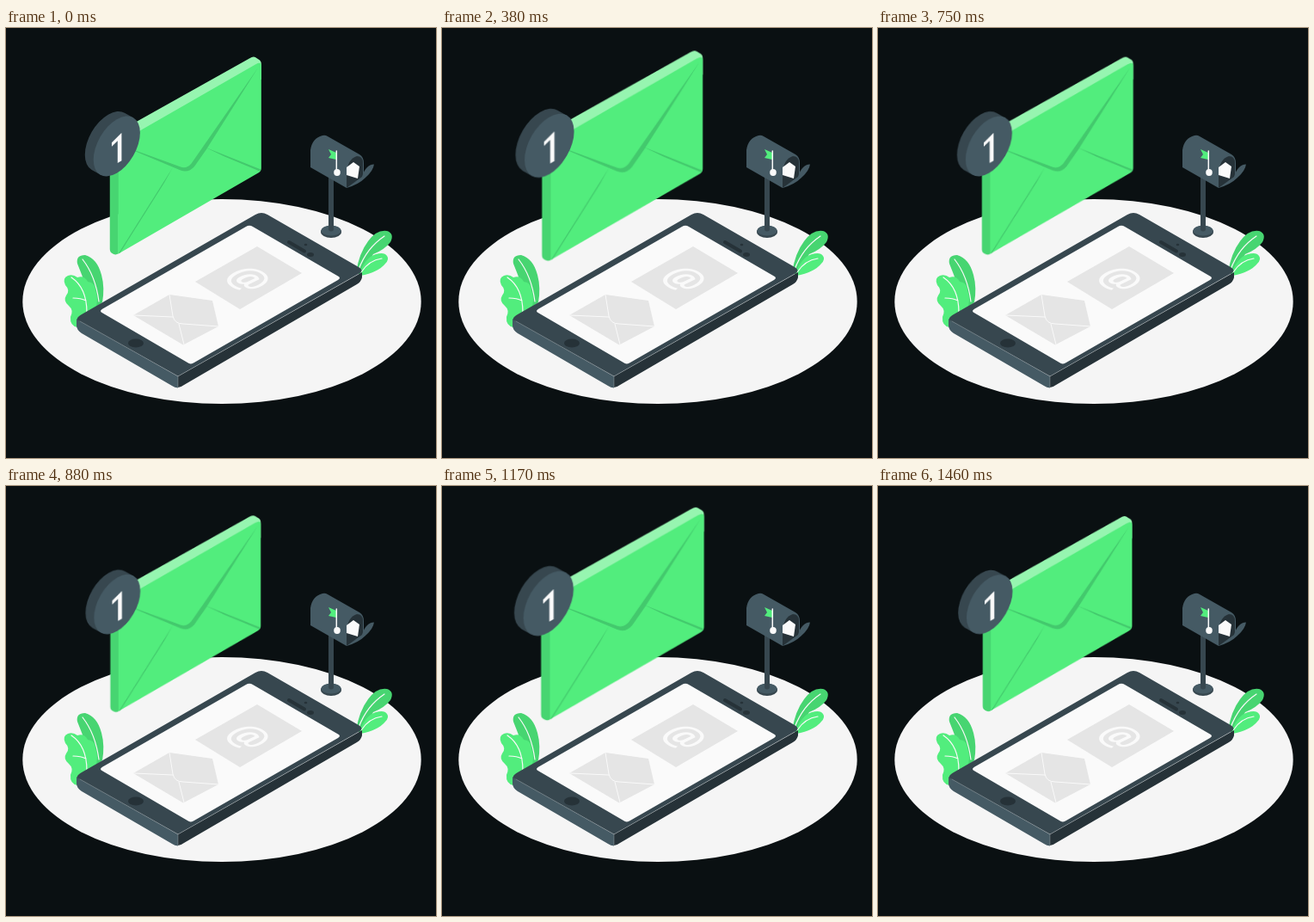
An HTML page without scripts that plays this animation: 500x500 px, repeating every 1.5 s.

```html
<!DOCTYPE html>
<html lang="en">
<head>
<meta charset="utf-8">
<title>New message</title>
<style>
  html, body { margin: 0; width: 100%; height: 100%; overflow: hidden; background: #0a1012; }
  svg { display: block; width: 100vw; height: 100vh; }
  .green { fill: #52ed7d; }
  .shade { fill: #47d571; }
  .steel { fill: #455a64; }
  .slate { fill: #37474f; }
  .night { fill: #263238; }
  .paper { fill: #fafafa; }
  .card { fill: #e5e5e5; }
  .crease { fill: #43c96d; }
  .line { fill: none; stroke: #fafafa; stroke-linecap: round; stroke-linejoin: round; }
  text { font-family: Roboto, sans-serif; fill: #fafafa; }

  .mail {
    transform-origin: 194.3px 148.5px;
    animation: heartbeat 1.5s -.65s linear infinite;
  }
  /* quick beat, quick beat, slow release */
  @keyframes heartbeat {
    0%, 40%, 100% { transform: scale(.986); }
    20%, 60% { transform: scale(1.087); }
  }
</style>
</head>
<body>
<svg viewBox="0 0 500 500">
  <ellipse cx="251" cy="318" rx="231.7" ry="119" fill="#f5f5f5"/>

  <g id="left-plant">
    <path class="shade" d="M83 274Q81 264 92 264Q106 268 111 287Q115 302 112 319L100 328Q94 300 83 274Z"/>
    <path class="green" d="M83 348Q74 346 75 336Q79 328 73 323Q66 317 70 311Q75 305 69 299Q65 291 72 288Q78 286 83 290Q91 287 95 295Q104 296 104 305Q108 316 104 326L100 336Z"/>
    <path class="line" stroke-width="1.2" d="M89 269Q104 288 108 318M76 290Q94 302 94 331M78 314Q87 314 93 317"/>
  </g>

  <g id="right-plant">
    <path class="shade" d="M407 284Q411 261 421 248Q431 234 443 236Q452 239 447 249Q440 258 427 263L412 287Z"/>
    <path class="green" d="M410 288Q417 267 430 263Q440 260 443 265Q446 269 441 274Q433 284 412 288Z"/>
    <path class="line" stroke-width="1.2" d="M410 281Q419 256 440 242M413 284Q422 270 437 268"/>
  </g>

  <g id="mailbox">
    <ellipse class="slate" cx="378" cy="237" rx="12" ry="7"/>
    <ellipse class="steel" cx="378" cy="235.5" rx="11.5" ry="6"/>
    <path class="slate" d="M375 170h6v65q-3 3-6 0z"/>
    <path class="steel" d="M354 162V142Q356 128 368 125Q371 124 374 126L411 147Q416 150 416 157V175L396 186Z"/>
    <path class="night" d="M396 186V167Q398 152 408 149Q415 149 415 157V175Z"/>
    <path class="paper" d="M396 162L404 156L411 161L409 175L396 171Z"/>
    <path class="steel" d="M396 186L414 173Q418 159 428 158.5Q427 166 418 174Q410 182 396 186Z"/>
    <path class="green" d="M375 141L384 145V153L375 151L378 147Z"/>
    <path class="line" stroke-width="1.5" d="M384.3 143V167"/>
    <ellipse class="paper" cx="385" cy="168" rx="3.8" ry="4"/>
  </g>

  <g id="phone">
    <path class="night" d="M200 405L414 284V290Q413 295 408 298L207 415Q203 418 200 418Z"/>
    <path class="steel" d="M82 338L200 405V418.5Q196 418 193 416L88 355Q82 351 82 346Z"/>
    <path class="slate" d="M86 341Q79 338 88 333L290 217Q297 213 304 217L410 278Q417 282 410 286L200 405Z"/>
    <path class="line" stroke-width=".7" opacity=".35" d="M86 341L200 405L410 286M200 405V418"/>
    <path class="paper" d="M112 331.3Q108 329 112 326.700L279 231Q283 228.700 287 231L386 288.500Q390 290.500 386 293L218 389.500Q214 391.500 211 389Z"/>
    <ellipse class="night" cx="151" cy="366.5" rx="9" ry="5"/>
    <path d="M329 249L347 259.5" stroke="#263238" stroke-width="4" stroke-linecap="round"/>
    <ellipse class="night" cx="354" cy="263.5" rx="4" ry="2.5"/>
    <ellipse class="night" cx="348.5" cy="252" rx="1.8" ry="1.2"/>

    <path class="card" d="M220 295L292 254L344 285L272 327Z"/>
    <text transform="matrix(.866 .5 -.866 .5 281 292.5)" y="10" font-size="42" font-weight="700" text-anchor="middle">@</text>

    <path class="card" d="M148 334L190 310L240 317L247 347L206 368.5Z"/>
    <path class="line" stroke-width="1" d="M190 310L194 335Q196 344 206 344L247 347M148 334L194 336M201 344L207 368"/>
  </g>

  <g class="mail">
    <path fill="#96f5b0" d="M121 130Q121 126 125 124L283 35.5Q287 33 290 34.5L293 36.5Q296.5 38 296.5 42V60L131 150Z"/>
    <path class="shade" d="M121 130L131 136V262Q128 264 125 262.5Q121 261 121 257Z"/>
    <path class="green" d="M130.5 138Q130.5 134 134 132L290 42.5Q296.5 39 296.5 44V163Q296.5 166.5 293 168.5L130.5 262.3Z"/>
    <path class="crease" d="M131 262L194 162L184 180L133 261Z"/>
    <path class="crease" d="M231 138.5L296 164.5L294.500 166.500L254 149.500Z"/>
    <path class="crease" d="M133 136L203 161.5Q210 164 215.500 157.500L293 46L233 141L219 161Q212 169 203 165.500Z"/>

    <g transform="matrix(.866 -.5 0 1 129 137.5)">
      <path class="slate" d="M22-22l-11.5-11.3A31.1 31.1 0 0 0-33.5 10.7L-22 22Z"/>
      <circle class="steel" r="31.2"/>
      <text x="-10.5" y="20" font-size="45" font-weight="500">1</text>
    </g>
  </g>
</svg>
</body>
</html>
```
